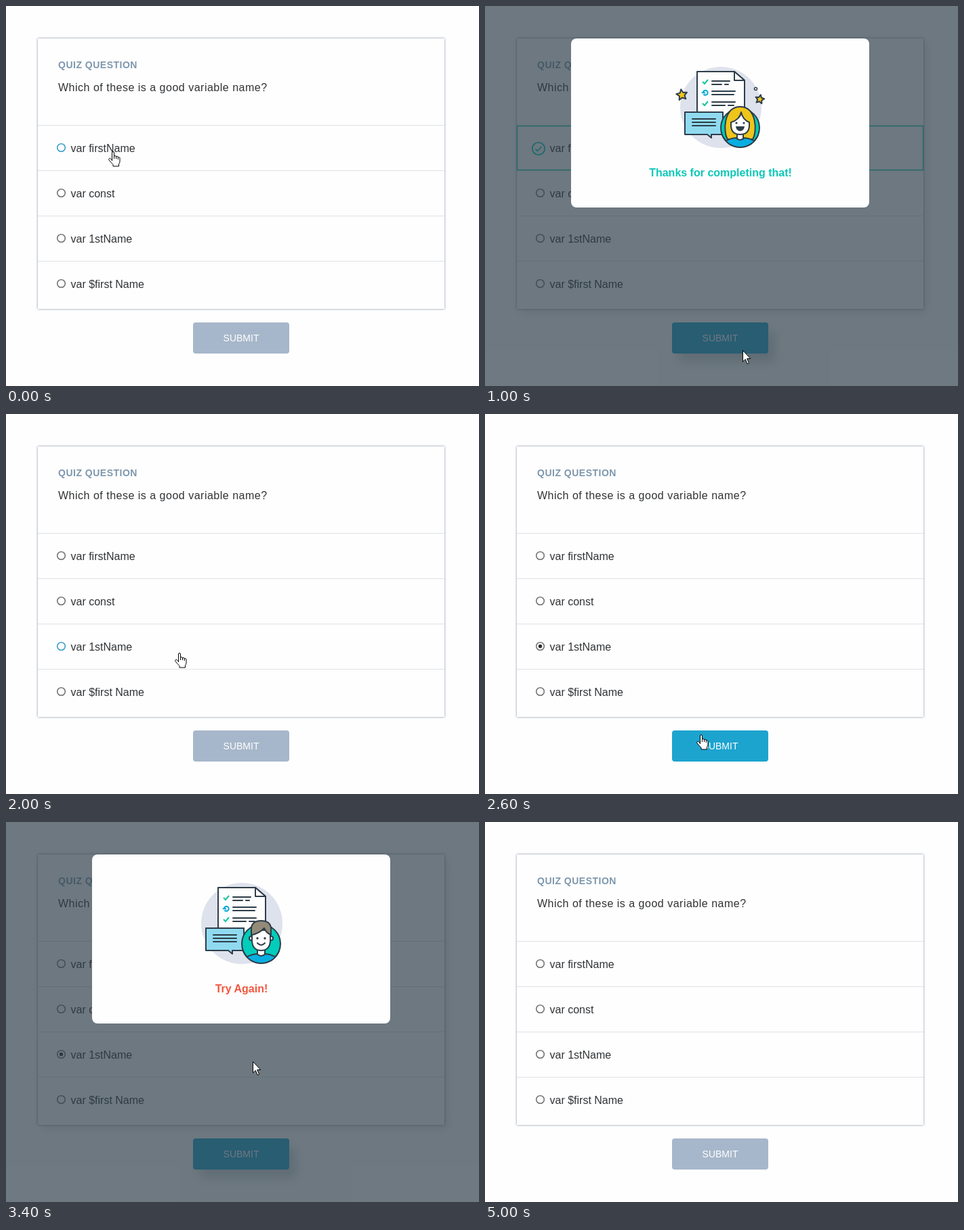
An HTML page that plays this animation: 698x562 px, repeating every 5400 ms.

```html
<!DOCTYPE html>
<html lang="en">
<head>
<meta charset="utf-8">
<title>Quiz question</title>
<style>
  html, body { margin: 0; width: 100%; height: 100%; overflow: hidden; background: #fefefe; }
  body { position: relative; font: 16px "Liberation Sans", Arial, sans-serif; }
  svg { position: absolute; left: 0; top: 0; display: block; }
  .card, .button, .shade, .modal { position: absolute; }
  .card { left: 47px; top: 48px; width: 600px; height: 400px; box-shadow: 0 0 3px rgba(46, 61, 95, .62); }
  .button { left: 276px; top: 468px; width: 142px; height: 46px; border-radius: 4px; background: #a7b7cb; }
  .shade { inset: 0; background: rgba(46, 61, 73, .69); }
  .modal { left: 127px; top: 48px; width: 440px; height: 250px; border-radius: 8px; background: #fefefe; }
  .ready .button { background: #1ca4cf; }
  .pass .button, .fail .button { box-shadow: 10px 13px 16px rgba(46, 61, 73, .2); }
  .pass .card, .fail .card { box-shadow: 0 0 3px rgba(46, 61, 95, .62), 4px 5px 14px rgba(46, 61, 73, .14); }

  .label { fill: #303336; }
  .rule { stroke: #dfe1e4; }
  .ring { fill: #fefefe; stroke: #757575; stroke-width: 1.6; }
  .hover .ring { stroke: #3a9fca; }
  .dot { fill: #2c2c2c; display: none; }
  .chosen .dot { display: inline; }
  .correct, .popup, .happy, .sad { display: none; }
  .pass .correct, .pass .happy, .fail .sad { display: inline; }
  .pass .popup, .fail .popup { display: block; }
  .pass .chosen circle { display: none; }

  .ink { stroke: #2e3d49; stroke-width: 2; stroke-linejoin: round; stroke-linecap: round; }
  .line { fill: none; }
  .white { fill: #fefefe; }
  .dark { fill: #2e3d49; }
  .teal { fill: #02ccba; }
  .blue { fill: #09aee0; }
  .gold { fill: #efc51b; }
  .tick { fill: none; stroke: #14c4a0; stroke-width: 2; }
  .message { font-weight: bold; text-anchor: middle; }
</style>
</head>
<body>
<div class="card"></div>
<div class="button"></div>

<svg width="698" height="562">
  <text x="77" y="92" font-size="14" font-weight="bold" letter-spacing=".5" fill="#7d97ad">QUIZ QUESTION</text>
  <text class="label" x="77" y="126" letter-spacing=".5">Which of these is a good variable name?</text>
  <g id="rows"></g>
  <g class="correct" fill="none" stroke="#02ccba">
    <rect x="47.5" y="177.5" width="599" height="65" stroke-width="1.3"/>
    <circle cx="79" cy="211" r="9.2" stroke-width="1.8"/>
    <path d="M74.5 211.5l3 3 6-6.500" stroke-width="1.8"/>
  </g>
  <text x="347" y="496" font-size="14" fill="#fefefe" text-anchor="middle">SUBMIT</text>
</svg>

<div class="popup shade"></div>
<div class="popup modal"></div>

<svg class="popup" width="698" height="562">
  <defs>
    <clipPath id="badge"><circle cx="376.500" cy="180" r="28.500"/></clipPath>
  </defs>
  <circle cx="348" cy="150" r="60" fill="#dde2ec"/>

  <path class="ink white" d="M313 97H368L383 110V186H313Z"/>
  <path class="ink white" d="M368 97V110H383Z"/>
  <path class="tick" d="M321 112l3 3 5-6M321 144l3 3 5-6"/>
  <path d="M322.500 126a3.500 3.500 0 1 1 0 4.500" fill="none" stroke="#09a9d8" stroke-width="2"/>
  <path d="M319 129l3.500-4 3.500 4.500z" fill="#09a9d8"/>
  <path class="ink line" d="M335 111H361M335 116H349M354 116H359M335 126H369M335 131H367M335 142H369M335 147H354M359 147H367"/>

  <path class="ink" fill="#90daf0" d="M295 157H351V190H334V195L328 190H295Z"/>
  <path class="ink line" d="M306 167H340M306 172H340M306 177H340"/>

  <circle class="ink teal" cx="376.500" cy="180" r="28.500"/>

  <g class="happy">
    <path class="ink gold" d="M358 197C351 186 352 149 376.500 149C401 149 402 186 395 197Z"/>
    <path class="ink white" d="M372 186V197Q376.500 201 381 197V186Z"/>
    <path class="ink white" d="M363 172C371 170 377 164 378 157C379 164 384 170 390 172V176Q390 190 376.500 190Q363 190 363 176Z"/>
    <circle class="dark" cx="371" cy="173" r="1.600"/>
    <circle class="dark" cx="382" cy="173" r="1.600"/>
    <path class="dark" d="M370 178H383Q382 185 376.500 185Q371 185 370 178Z"/>
  </g>

  <g class="sad">
    <path class="ink white" d="M371 186V197Q376.500 202 382 197V186Z"/>
    <circle class="ink white" cx="362" cy="172" r="3"/>
    <circle class="ink white" cx="391" cy="172" r="3"/>
    <path class="ink white" d="M363 160H390V176Q389 190 376.500 190Q364 190 363 176Z"/>
    <path class="ink" fill="#948a78" d="M362 167V157Q363 146 376.500 146Q390 146 391 157V167Q384 164 381 157Q374 165 362 167Z"/>
    <circle class="dark" cx="371" cy="172" r="1.700"/>
    <circle class="dark" cx="382" cy="172" r="1.700"/>
    <path class="ink line" d="M371 179Q376.500 185 382 179"/>
  </g>

  <g clip-path="url(#badge)">
    <path class="ink blue" d="M347 206Q357 196 370 195Q376.500 201 383 195Q396 196 406 206V214H347Z"/>
  </g>
  <path class="ink line" d="M350 191A28.500 28.500 0 0 0 403 191"/>

  <g class="happy">
    <path id="star" class="ink gold"/>
    <path id="smallStar" class="ink gold"/>
    <circle class="white" cx="399.500" cy="122.500" r="2" stroke="#2e3d49" stroke-width="1.500"/>
    <text class="message" x="347.500" y="252" fill="#0cc8b8">Thanks for completing that!</text>
  </g>
  <text class="sad message" x="347.500" y="252" fill="#f2573f">Try Again!</text>
</svg>

<svg width="698" height="562" stroke="#000" stroke-linejoin="round">
  <g id="hand" class="white">
    <path d="M5.500 14V2Q5.500 .5 7 .5Q8.500 .5 8.500 2V7.500Q8.500 6.500 9.800 6.500Q11.500 6.500 11.500 8Q11.500 7.300 12.700 7.300Q14.300 7.300 14.300 9Q14.300 8.500 15.300 8.500Q17 8.500 17 10V15Q17 17 15.500 18.500V22H7V19.500Q4 16.500 1 12.800Q.3 11 1.400 10.400Q2.800 10 3.800 11.200L5.500 13Z"/>
    <path d="M8.500 7.500V11M11.500 8V11M14.300 9V12" fill="none"/>
  </g>
  <path id="arrow" class="white" d="M.5 .5V17L4.300 13.400L7.200 20.300L9.600 19.300L6.700 12.500H11.800Z"/>
</svg>

<script>
  const byId = id => document.getElementById(id);
  const LOOP = 5400;

  byId("rows").innerHTML = ["var firstName", "var const", "var 1stName", "var $first Name"]
    .map((name, i) => {
      const y = 176.5 + i * 67;
      return `<g class="row">
        <path class="rule" d="M47 ${y}H647"/>
        <circle class="ring" cx="81.5" cy="${y + 33}" r="5.800"/>
        <circle class="dot" cx="81.5" cy="${y + 33}" r="2.700"/>
        <text class="label" x="95.500" y="${y + 39.5}">${name}</text>
      </g>`;
    }).join("");
  const rows = [...document.querySelectorAll(".row")];

  function starPath(cx, cy, r, turn) {
    const points = Array.from({ length: 10 }, (_, i) => {
      const a = turn + i * Math.PI / 5;
      const d = i % 2 ? r * 0.48 : r;
      return (cx + d * Math.sin(a)).toFixed(2) + " " + (cy - d * Math.cos(a)).toFixed(2);
    });
    return "M" + points.join("L") + "Z";
  }
  byId("star").setAttribute("d", starPath(290.5, 131.5, 8.3, -0.15));
  byId("smallStar").setAttribute("d", starPath(405.5, 138, 6.8, 0.2));

  // Pointer: start time, shape, x, y
  const pointer = [
    [0, "hand", 151, 215],
    [400, "arrow", 372, 517],
    [600, "arrow", 378, 520],
    [800, "hand", 375, 506],
    [1000, "arrow", 380, 509],
    [1200, "arrow", 379, 508],
    [1400, "arrow", 351, 425],
    [1600, "arrow", 351, 381],
    [1800, "arrow", 334, 373],
    [2000, "hand", 249, 353],
    [2200, "hand", 228, 342],
    [2400, "hand", 230, 343],
    [2600, "hand", 312, 474],
    [2800, "arrow", 318, 474],
    [3000, "arrow", 344, 420],
    [3200, "arrow", 363, 355],
    [3400, "arrow", 364, 354],
    [4400, "hand", 359, 356],
    [4600, "arrow", 310, 453],
    [4800, "arrow", 261, 525],
    [5000, "none", 0, 0]
  ];

  // Quiz: start time, hovered row, chosen row, page state
  const quiz = [
    [0, 0, -1, ""],
    [200, -1, 0, "ready"],
    [1000, -1, 0, "ready pass"],
    [2000, 2, -1, ""],
    [2400, -1, 2, "ready"],
    [2800, -1, 2, "ready fail"],
    [4400, 2, -1, ""],
    [4600, -1, -1, ""]
  ];

  const at = (steps, t) => steps.filter(s => s[0] <= t).pop();

  function draw(now) {
    const t = now % LOOP;
    const [, shape, x, y] = at(pointer, t);
    for (const id of ["hand", "arrow"]) {
      byId(id).style.display = id === shape ? "inline" : "none";
      byId(id).setAttribute("transform", `translate(${x} ${y})`);
    }
    const [, hovered, chosen, state] = at(quiz, t);
    document.body.className = state;
    rows.forEach((row, i) => {
      row.classList.toggle("hover", i === hovered);
      row.classList.toggle("chosen", i === chosen);
    });
  }

  const start = performance.now();
  function tick() {
    draw(performance.now() - start);
    requestAnimationFrame(tick);
  }
  tick();
</script>
</body>
</html>
```
